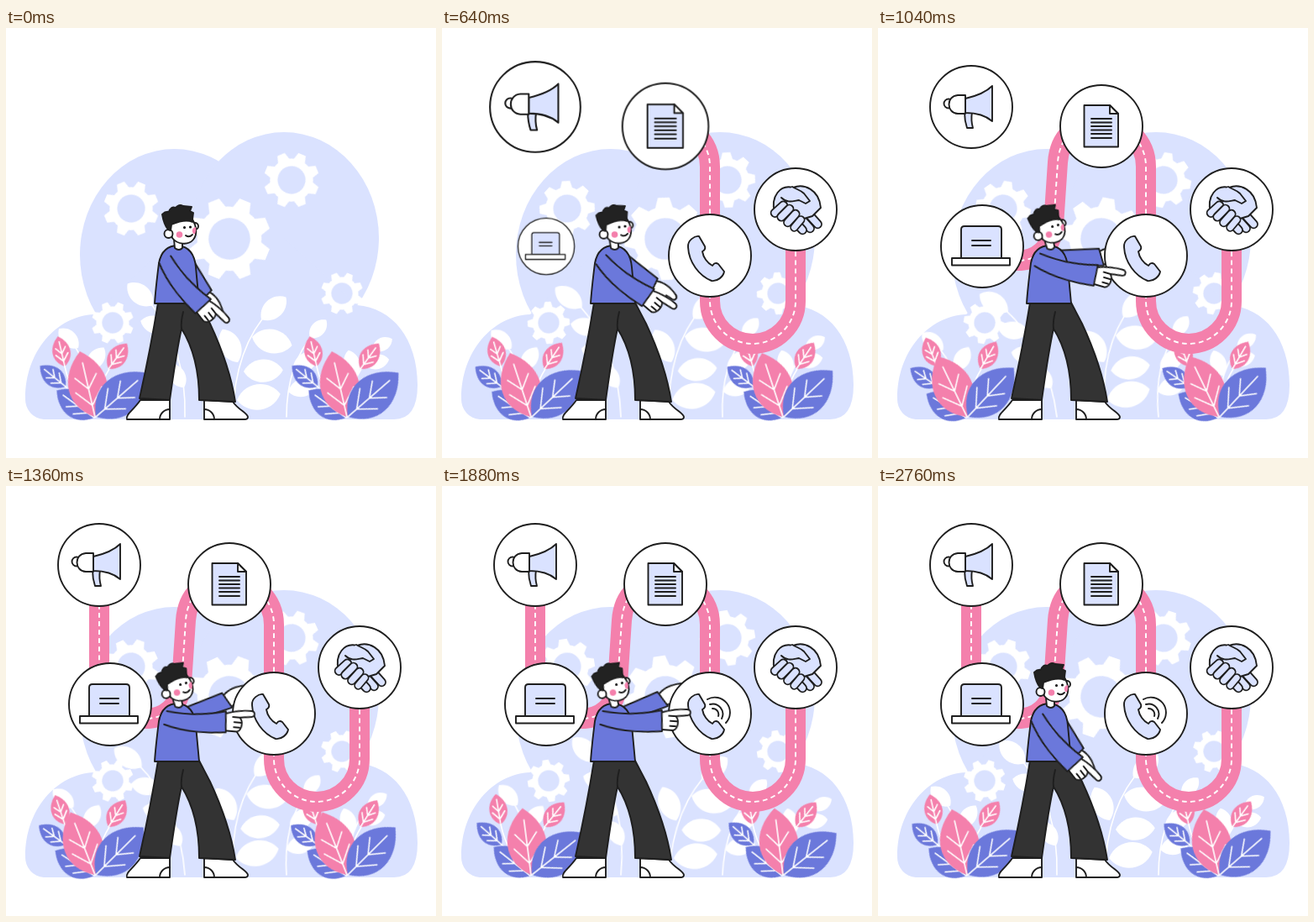
Animation, 512 px wide and 512 px high, one loop 2880 ms. Source, as an HTML page without scripts:

```html
<!DOCTYPE html>
<html lang="en">
<head>
<meta charset="utf-8">
<title>Customer journey</title>
<style>
html, body { margin: 0; width: 100%; height: 100%; overflow: hidden; background: #fff; }
svg { display: block; width: 100vw; height: 100vh; }
.ink { stroke: #1e1e1e; stroke-width: 1.9; stroke-linejoin: round; stroke-linecap: round; }
.line { fill: none; }
.white { fill: #fff; }
.pale { fill: #dae2ff; }
.blue { fill: #6b78db; }
.pink { fill: #f480ac; }
.dark { fill: #333; }
.hair { fill: #222; }
.vein { fill: none; stroke: #fff; stroke-width: 1.6; stroke-linecap: round; vector-effect: non-scaling-stroke; }

.spin, .sway, .near, .far, .head, .pop, .reveal, .wave { animation: 2880ms linear infinite; }
.spin { animation-name: spin; }
.sway { animation-name: sway; }
.near { animation-name: near; }
.far { animation-name: far; }
.head { animation-name: head; }
.reveal { stroke-dasharray: 1000; animation-name: reveal; }
.sway, .near, .far, .head { animation-timing-function: ease-in-out; }
.pop { animation-timing-function: cubic-bezier(.3, .3, .6, 1); }
.hands { animation-name: pop-hands; }
.phone { animation-name: pop-phone; }
.doc { animation-name: pop-doc; }
.horn { animation-name: pop-horn; }
.laptop { animation-name: pop-laptop; }

@keyframes spin { to { transform: rotate(90deg); } }
@keyframes sway {
  0%, 95.8%, 100% { transform: rotate(0deg); }
  8% { transform: rotate(calc(var(--k) * .2)); }
  22.2% { transform: rotate(calc(var(--k) * -.4)); }
  37.8% { transform: rotate(calc(var(--k) * -1)); }
  47.2% { transform: rotate(calc(var(--k) * -.65)); }
  69% { transform: rotate(calc(var(--k) * .5)); }
  80.6% { transform: rotate(calc(var(--k) * -.18)); }
  87% { transform: rotate(calc(var(--k) * -.2)); }
}
@keyframes near {
  0%, 6.6%, 93%, 100% { transform: rotate(52deg); }
  52%, 68% { transform: rotate(4deg); }
}
@keyframes far {
  0%, 6.6%, 93%, 100% { transform: rotate(62deg); }
  52%, 68% { transform: rotate(-20deg); }
}
@keyframes head {
  0%, 13%, 93%, 100% { transform: rotate(0deg); }
  37%, 68% { transform: rotate(-12deg); }
}
@keyframes reveal {
  0%, 1.4% { stroke-dashoffset: 1000; }
  44.4%, 100% { stroke-dashoffset: 0; }
}
@keyframes pop-hands { 0%, .7% { transform: scale(0); } 10.4% { transform: scale(1.1); } 17.4%, 100% { transform: none; } }
@keyframes pop-phone { 0%, 3.5% { transform: scale(0); } 14.6% { transform: scale(1.1); } 21.5%, 100% { transform: none; } }
@keyframes pop-doc { 0%, 8.3% { transform: scale(0); } 19.4% { transform: scale(1.1); } 26.4%, 100% { transform: none; } }
@keyframes pop-horn { 0%, 11.1% { transform: scale(0); } 22.2% { transform: scale(1.1); } 29.2%, 100% { transform: none; } }
@keyframes pop-laptop { 0%, 17.5% { transform: scale(0); } 27.6% { transform: scale(1.1); } 34.6%, 100% { transform: none; } }
.wave { opacity: 0; animation-timing-function: step-end; }
.w1 { animation-name: wave1; }
.w2 { animation-name: wave2; }
.w3 { animation-name: wave3; }
@keyframes wave1 { 0% { opacity: 0; } 51.4%, 100% { opacity: 1; } }
@keyframes wave2 { 0% { opacity: 0; } 55.6%, 100% { opacity: 1; } }
@keyframes wave3 { 0% { opacity: 0; } 59.8%, 100% { opacity: 1; } }
</style>
</head>
<body>
<svg viewBox="0 0 512 512">
<defs>
  <path id="tooth" d="M-11-35L-7-49H7L11-35Z"/>
  <g id="teeth2"><use href="#tooth"/><use href="#tooth" transform="rotate(180)"/></g>
  <g id="teeth4"><use href="#teeth2"/><use href="#teeth2" transform="rotate(90)"/></g>
  <g id="gear" transform="rotate(22.5)" fill="#fff">
    <use href="#teeth4"/><use href="#teeth4" transform="rotate(45)"/>
    <circle r="31.5" fill="none" stroke="#fff" stroke-width="13.5"/>
  </g>

  <g id="leaf">
    <path d="M0 0C-32-20-30-56 0-80C30-56 32-20 0 0Z"/>
    <path class="vein" d="M0 0V-66M0-14L-16-33M0-14L16-33M0-34L-13-50M0-34L13-50"/>
  </g>
  <path id="petal" d="M0 0C-14-8-14-28 0-36C14-28 14-8 0 0Z"/>
  <path id="stems" class="vein" d="M70 403Q78 440 104 461M71 427Q88 445 104 462M123 406Q108 430 106 462"/>

  <path id="track" pathLength="1000" d="M421 216V325A51 51 0 0 1 319 325V165A53 53 0 0 0 266 112C235 112 216 130 214 160L209 235C207 262 190 277 165 277H140C120 277 111 262 111 245V94"/>
  <mask id="drawn" maskUnits="userSpaceOnUse" x="0" y="0" width="512" height="512">
    <use href="#track" class="reveal" fill="none" stroke="#fff" stroke-width="28"/>
  </mask>
  <circle id="disc" class="ink white" r="49"/>
  <rect id="finger" class="ink pale" x="-4.8" width="9.6" height="23" rx="4.8"/>
</defs>

<g class="pale">
  <ellipse cx="200.5" cy="270" rx="112.5" ry="126"/>
  <ellipse cx="331" cy="250" rx="113" ry="126"/>
  <path d="M45 466A23 24 0 0 1 23 441C23 385 60 343 105 341L200 250H331L418 330C460 333 490 370 490 425Q490 466 462 466Z"/>
</g>

<g transform="translate(149 215) scale(.67)"><use href="#gear" class="spin"/></g>
<g transform="translate(340 181) scale(.67)"><use href="#gear" class="spin"/></g>
<g transform="translate(266 251)"><use href="#gear" class="spin"/></g>
<g transform="translate(400 316) scale(.51)"><use href="#gear" class="spin"/></g>
<g transform="translate(127 351) scale(.51)"><use href="#gear" class="spin"/></g>

<g class="white">
  <g transform="translate(213 463)"><g class="sway" style="--k:9deg">
    <path class="vein" d="M0 0Q2-83-43-138"/>
    <use href="#petal" transform="translate(-38-133) rotate(-50) scale(1.1)"/>
    <use href="#petal" transform="translate(-18-105) rotate(-75)"/>
    <use href="#petal" transform="translate(-8-72) rotate(-70)"/>
    <use href="#petal" transform="translate(-1-35) rotate(-30) scale(.9)"/>
  </g></g>
  <g transform="translate(270 463)"><g class="sway" style="--k:6deg">
    <path class="vein" d="M0 0Q2-83 45-128"/>
    <use href="#petal" transform="translate(34-116) rotate(48) scale(1.1)"/>
    <use href="#petal" transform="translate(23-95) rotate(102) scale(1.35)"/>
    <use href="#petal" transform="translate(13-54) rotate(88) scale(1.3)"/>
    <use href="#petal" transform="translate(5-20) rotate(82) scale(1.45)"/>
    <use href="#petal" transform="translate(6-65) rotate(-25) scale(1.2)"/>
  </g></g>
  <g transform="translate(334 463)"><g class="sway" style="--k:6deg">
    <path class="vein" d="M0 0Q0-63 34-101"/>
    <use href="#petal" transform="translate(28-94) rotate(42) scale(.8)"/>
    <use href="#petal" transform="translate(8-55) rotate(55)"/>
    <use href="#petal" transform="translate(2-30) rotate(75)"/>
  </g></g>
  <g transform="translate(106 463)"><g class="sway" style="--k:6deg">
    <path class="vein" d="M0 0Q-4-60-30-92"/>
    <use href="#petal" transform="translate(-20-82) rotate(-45) scale(.9)"/>
    <use href="#petal" transform="translate(-8-56) rotate(35) scale(.9)"/>
  </g></g>
  <g transform="translate(406 463)"><g class="sway" style="--k:6deg">
    <path class="vein" d="M0 0Q4-60 40-86"/>
    <use href="#petal" transform="translate(30-80) rotate(62) scale(.75)"/>
    <use href="#petal" transform="translate(20-63) rotate(80) scale(.85)"/>
    <use href="#petal" transform="translate(10-48) rotate(-15) scale(.9)"/>
  </g></g>
</g>

<!-- bushes: swaying leaves stay outside <use> clones so that they animate -->
<g>
  <use href="#stems"/>
  <g class="pink" transform="translate(70 403) rotate(-13) scale(.46)"><use href="#leaf" class="sway" style="--k:8deg"/></g>
  <g class="pink" transform="translate(122 406) rotate(36) scale(.47)"><use href="#leaf" class="sway" style="--k:6deg"/></g>
  <g class="blue" transform="translate(71 427) rotate(-51) scale(.49)"><use href="#leaf" class="sway" style="--k:5deg"/></g>
  <g class="blue" transform="translate(105 464) rotate(-54) scale(.69)"><use href="#leaf" class="sway" style="--k:5deg"/></g>
  <g class="pink" transform="translate(106 463) rotate(-13)"><use href="#leaf" class="sway" style="--k:13deg"/></g>
  <g class="blue" transform="translate(107 463) rotate(49)"><use href="#leaf" class="sway" style="--k:6deg"/></g>
</g>
<g transform="translate(300 0)">
  <use href="#stems"/>
  <g class="pink" transform="translate(70 403) rotate(-13) scale(.46)"><use href="#leaf" class="sway" style="--k:8deg"/></g>
  <g class="pink" transform="translate(122 406) rotate(36) scale(.47)"><use href="#leaf" class="sway" style="--k:6deg"/></g>
  <g class="blue" transform="translate(71 427) rotate(-51) scale(.49)"><use href="#leaf" class="sway" style="--k:5deg"/></g>
  <g class="blue" transform="translate(105 464) rotate(-54) scale(.69)"><use href="#leaf" class="sway" style="--k:5deg"/></g>
  <g class="pink" transform="translate(106 463) rotate(-13)"><use href="#leaf" class="sway" style="--k:13deg"/></g>
  <g class="blue" transform="translate(107 463) rotate(49)"><use href="#leaf" class="sway" style="--k:6deg"/></g>
</g>

<g mask="url(#drawn)" fill="none">
  <use href="#track" stroke="#f480ac" stroke-width="24"/>
  <use href="#track" stroke="#fff" stroke-width="1.9" stroke-dasharray="6 4.5"/>
</g>

<!-- far arm -->
<g transform="translate(212 272)"><g class="far">
  <path class="ink white" d="M52-7C60-12 68-13 80-10C85-8 84-3 79-3L72-2C76 3 72 9 66 9L54 8Z"/>
  <path class="ink blue" d="M0-7L51-10L57 10L0 11Z"/>
</g></g>

<g transform="translate(421 216)"><g class="pop hands">
  <use href="#disc"/>
  <use href="#finger" transform="translate(14 4) rotate(-42)"/>
  <use href="#finger" transform="translate(5 9) rotate(-42)"/>
  <use href="#finger" transform="translate(-4 11) rotate(-42)"/>
  <path class="ink pale" d="M-25 4C-30-16-18-30-3-26C10-31 28-24 30-2L20 8L0 14L-14 10Z"/>
  <use href="#finger" transform="translate(-11-8) rotate(48)"/>
  <use href="#finger" transform="translate(-4-4) rotate(45)"/>
  <use href="#finger" transform="translate(3 2) rotate(42)"/>
  <use href="#finger" transform="translate(9 9) rotate(40) scale(.9)"/>
  <path class="ink pale" d="M-17-14C-10-7-3-10 4-11L12-7L17-10L10-19C6-23 1-24-4-27"/>
</g></g>

<g transform="translate(319 271)"><g class="pop phone">
  <use href="#disc"/>
  <path class="ink pale" d="M-26-10C-27-18-18-24-13-23L-6-11C-5-8-7-6-9-5C-8 2-3 9 3 12C5 9 7 8 10 10L17 19C16 25 9 31 2 30C-13 24-25 8-26-10Z"/>
  <path class="ink line wave w1" d="M3-6A7 7 0 0 1 10 3"/>
  <path class="ink line wave w2" d="M0-11A12 12 0 0 1 14 6"/>
  <path class="ink line wave w3" d="M-3-17A18 18 0 0 1 19 11"/>
</g></g>

<g transform="translate(266 117)"><g class="pop doc">
  <use href="#disc"/>
  <path class="ink pale" d="M-20.500-25H10L20-15V24.500H-20.500Z"/>
  <path class="ink white" d="M10-25V-15H20Z"/>
  <path class="ink line" d="M-12-9H12M-12-4.500H12M-12 0H12M-12 4.500H12M-12 9H12M-12 14H12"/>
</g></g>

<g transform="translate(111 94)"><g class="pop horn">
  <use href="#disc"/>
  <path class="ink pale" d="M-8 6C-8 13-7 19-5 25H2C0 18 0 12 1 6Z"/>
  <path class="ink pale" d="M-7-10C6-13 17-17 25-25V17C17 10 6 7-7 7Z"/>
  <circle class="ink white" cx="-27" cy="-4" r="5.500"/>
  <path class="ink white" d="M-7-14V8H-16C-30 7-30-13-16-14Z"/>
</g></g>

<g transform="translate(124 260)"><g class="pop laptop">
  <use href="#disc"/>
  <path class="ink pale" d="M-25 14V-20Q-25-24-21-24H19Q23-24 23-20V14Z"/>
  <rect class="ink white" x="-36" y="14" width="69" height="8.500"/>
  <path class="ink line" d="M-12-7H10M-12-1H10"/>
</g></g>

<!-- man -->
<path class="ink white" d="M160 443L195 443V466H144C142 460 152 455 160 443ZM236 443L270 445C277 455 287 458 288 463Q288 466 284 466H236Z"/>
<path class="ink line" d="M195 454A12 12 0 0 0 183 466M236 454A12 12 0 0 1 248 466"/>
<path class="ink dark" d="M181 327C175 365 167 405 159 441L195 443C199 415 203 385 209 358C224 382 230 412 230 443L273 445C268 412 256 380 243 352C238 342 234 335 230 327Z"/>
<path class="ink line" d="M211 338Q208 350 209 358"/>
<path class="ink blue" d="M177 328C178 312 180 296 182 280Q186 259 205 259Q224 261 226 285L230 328Z"/>

<g transform="translate(205 260)"><g class="head">
  <path class="ink white" d="M-5-8L-4 2Q1 6 5 2V-6Z"/>
  <circle class="ink white" cx="20" cy="-24" r="4"/>
  <path class="ink white" d="M-11-28C-9-35 12-37 17-32C22-24 23-14 18-8C12-1-1-2-7-10Z"/>
  <circle class="ink white" cx="-11.500" cy="-15" r="5"/>
  <path class="ink hair" d="M-12-20C-16-25-18-32-19-38Q-15-42-11-41Q-9-48-3-46Q1-51 6-48L16-47L14-42L18-40Q17-34 17-29C9-33-1-29-8-26L-9-19Z"/>
  <circle class="pink" cx="1.500" cy="-14" r="3.800"/>
  <path class="pink" d="M21-23Q16-22 17-17Q18-14 20-15Q22-19 21-23Z"/>
  <circle cx="7.500" cy="-22.500" r="1.500"/><circle cx="14.500" cy="-23" r="1.500"/>
  <path class="ink line" d="M9-13Q13-10 17-14"/>
</g></g>

<!-- near arm -->
<g transform="translate(190 275)"><g class="near">
  <path class="ink white" d="M70-10C78-13 88-16 101-16C106-16 107-10 102-9L88-7C93-3 92 8 86 10L72 10Z"/>
  <path class="ink line" d="M88-7H80M90-1H82M89 5H82"/>
  <path class="blue" d="M1-7Q36-3 71-13L73 12Q30 18-1 9Z"/>
  <path class="ink line" d="M1-7Q36-3 71-13L73 12Q30 18-1 9"/>
</g></g>
</svg>
</body>
</html>
```
